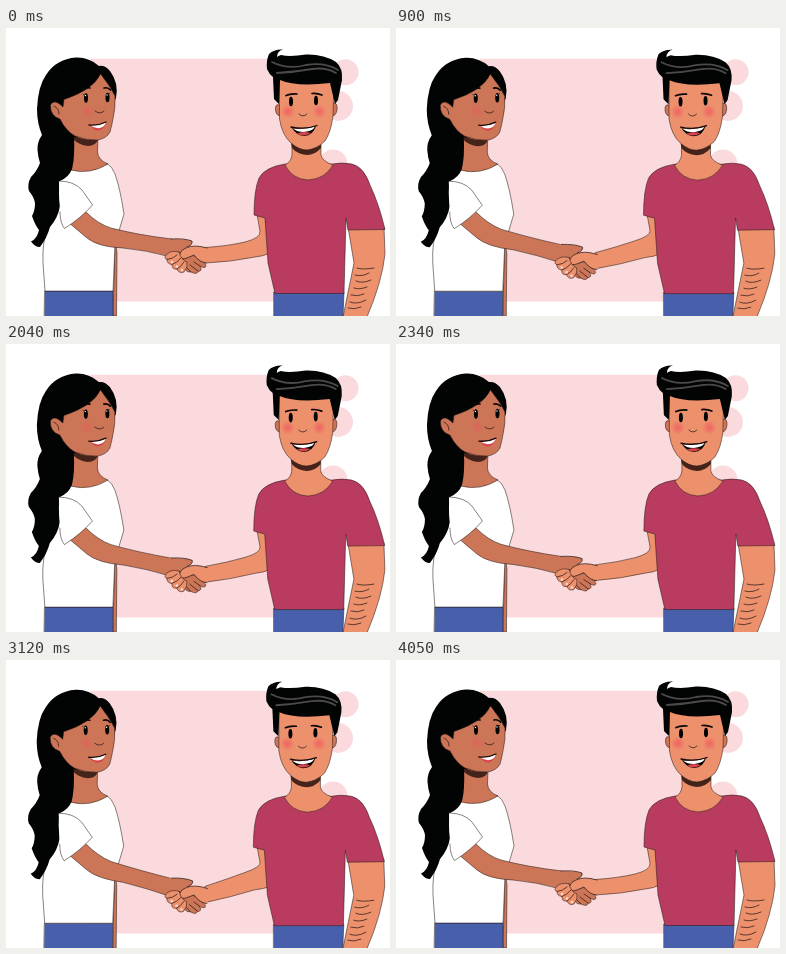
An HTML page for the animation above (5.34 s loop, 384x288 px).

```html
<!DOCTYPE html>
<html lang="en">
<head>
<meta charset="utf-8">
<title>Handshake</title>
<style>
html, body { margin: 0; width: 100%; height: 100%; overflow: hidden; background: #fff; }
svg { display: block; width: 100vw; height: 100vh; }
.line { stroke: #2a1c1a; stroke-width: .55; stroke-linejoin: round; stroke-linecap: round; }
.stroke { fill: none; stroke: #1d1413; stroke-width: .7; stroke-linecap: round; }
.brow { fill: none; stroke: #080606; stroke-width: 1.7; stroke-linecap: round; }
.lip { fill: none; stroke: #140607; stroke-width: 1.3; stroke-linecap: round; }
.pink { fill: #fadadc; }
.jeans { fill: #4860ab; }
.tan { fill: #cd7557; }
.peach { fill: #ed906c; }
.berry { fill: #b93b5f; }
.shade { fill: #43231a; }
.black { fill: #020303; }
.white { fill: #fff; }
.red { fill: #d8434a; }
.nail { fill: #fbd9cd; }
</style>
</head>
<body>
<svg viewBox="0 0 384 288">
  <defs>
    <radialGradient id="blush">
      <stop offset=".2" stop-color="#f0525c" stop-opacity=".6"/>
      <stop offset="1" stop-color="#f0525c" stop-opacity="0"/>
    </radialGradient>
  </defs>

  <g class="pink">
    <path d="M84 30.700H312V273.600H84Z"/>
    <circle cx="339.500" cy="44.300" r="13"/>
    <circle cx="332" cy="78" r="15"/>
    <circle cx="327" cy="136" r="14.500"/>
  </g>

  <g id="woman">
    <path class="tan line" d="M109 212L107 288H110.500L111 225Z"/>
    <path class="jeans line" d="M39 263H107V289H38.500Z"/>
    <path class="white line" d="M66 141Q57 145 52 154L42 198Q36 214 37 235L39 263H107L109 216L118 186Q114 160 109 146Q106 138 101 135.500Q84 141 66 141Z"/>
    <path class="tan line" d="M68 103L67 130Q67 137 65 142Q84 147 102 136Q92 132 91.500 124L92 109Z"/>
    <path class="shade" d="M67 107Q76 113 92 111.500Q90 118 82 118Q73 117 67 111Z"/>
    <path class="black" d="M70 29.500Q50 31 40 47Q32 58 31 81Q31 95 36 107Q31 114 31.500 122Q32 129 34 135Q31 143 25 149Q21 156 23 163Q28 169 29 175Q29 183 26 188Q29 197 33 202Q31 211 25 213.500Q29 219 34 219Q41 210 44 199Q52 190 54 178Q52 163 54 153Q63 149 66 141Q69 128 68 109Q88 111 97 100L110 70Q113 55 104 43Q99 37 93 38Q83 29 70 29.500Z"/>
    <path class="tan line" d="M94.500 46Q87 62 58 71.500L57 79Q48 70 44.500 77Q44 88 54 91Q60 103 69 108Q80 112.500 92 112Q101 110 104 104Q106 97 107.500 88Q109.500 80 109 68Q104 58 99 52Z"/>
    <path class="stroke" d="M48 78Q53 80 53 86M89 83Q94 87 98 83"/>
    <circle cx="81" cy="83" r="6.500" fill="url(#blush)" opacity=".65"/>
    <g class="black">
      <ellipse cx="80" cy="70" rx="2" ry="4.700"/>
      <ellipse cx="101.500" cy="69.500" rx="2" ry="4.700"/>
    </g>
    <path class="stroke" d="M77 66L79 68M104 65L102 67"/>
    <circle class="white" cx="79.500" cy="67.500" r=".7"/>
    <circle class="white" cx="101" cy="67" r=".7"/>
    <path class="brow" d="M76 62Q80 59 84 60M98 60Q102 59 104.500 62"/>
    <path class="red" d="M84 97Q92 98 100 94.500Q98 102 92 102.500Q87 102 84 97Z"/>
    <path class="white" d="M84 97Q92 98 100 94.500Q98 100 92 100.300Q87 100 84 97Z"/>
    <path class="lip" d="M83 97Q92 98 100 94"/>
  </g>

  <g id="man">
    <path class="peach line" d="M342 199L348 235L337 289H361Q376 254 379 226L378 199Z"/>
    <path class="stroke" d="M351 240Q357 242 368 240M349 247Q356 249 363 245M350 253Q356 256 365 252M348 260Q353 262 361 259M345 267Q352 269 358 266M344 274Q351 277 360 272M342 280Q348 282 355 279"/>
    <path class="jeans line" d="M268 264H338L337 289H268Z"/>
  </g>

  <path id="womanArm" class="tan line"/>
  <path id="manArm" class="peach line"/>

  <g id="manTop">
    <path class="berry line" d="M279 136Q259 139 253 150Q248 162 248 187L259 190L262 235L269 265.500H338L340 190L342 202L379 201.500Q373 176 364 157Q358 139 346 136Q336 134 326 136Z"/>
    <path class="peach line" d="M286 107V127Q285 134 279 137Q286 151 302 152Q319 151 327 137Q316 133 315 127V107Z"/>
    <path class="shade" d="M285 115Q300 126 315 116V120Q309 127 301 127Q291 126 286 120Z"/>
    <path class="tan line" d="M274 77Q269 75 269.500 82Q270 88 275 88M327 75Q332 74 331 82Q330 88 326 88"/>
    <path class="peach line" d="M273.500 50V91Q276 107 285 115Q293 122 301 122Q311 121 319 113Q325 104 327 88L328 50Z"/>
    <path class="black" d="M277 21.500Q268 21 263 26Q260 33 261 41Q263 46 267 49L268 71L273 76L274 52Q290 59 324 55L329 76L332 72L336 52Q337 40 330 34Q318 26 300 26.500Q284 29 275 27Q272 28 271 29Q271 23 277 21.500Z"/>
    <path fill="none" stroke="#4b494b" stroke-width="1.800" stroke-linecap="round" d="M266 34Q281 42 300 37Q319 34 332 42M271 45Q289 44 306 41Q320 39 330 45"/>
    <circle cx="282" cy="83.500" r="7" fill="url(#blush)"/>
    <circle cx="313.500" cy="83.500" r="7" fill="url(#blush)"/>
    <g class="black">
      <ellipse cx="285" cy="73.500" rx="2" ry="4.800"/>
      <ellipse cx="310" cy="72.500" rx="2" ry="4.800"/>
    </g>
    <path class="brow" d="M280 67.500Q284 65.500 291 66M306 65.500Q311 65 316 67"/>
    <path class="stroke" d="M293 86Q297 90 301 86"/>
    <path class="black" d="M286 100Q299 102 310 98Q307 107.500 298 108Q290 107 286 100Z"/>
    <path class="red" d="M291 105.500Q298 103 305 105Q298 109.500 291 105.500Z"/>
    <path class="white" d="M287 100.500Q299 102 309 98.500Q307 103 298 104Q291 104 287 100.500Z"/>
    <path class="lip" d="M285 99Q299 102 311 97.500"/>
  </g>

  <path id="sleeve" class="white line" d="M53 153Q68 153 76 162L86.500 177Q75 190 58.500 200.500Q54 195 54 184"/>

  <g id="hands">
    <path class="tan" d="M160 211.300Q178 210 186 213Q187 217 181 219Q174 224 178 230L166 236L160 228Z"/>
    <path class="stroke" d="M165 211Q178 210 186 213Q187 217 181 219"/>
    <path class="tan line" d="M176 231Q184 225 191 229Q199 234 200 238Q199 241 194 238Q197 243 192 243.500Q191 247 185 244Q180 245 176 237Z"/>
    <path class="stroke" d="M194 238L188 234M192 243L184 237M185 244L180 239"/>
    <path class="peach" d="M202 220Q188 216 180 220Q173 223 173.500 229Q176 232 181 230L188 227Q194 235 202 235Z"/>
    <path class="stroke" d="M201 220Q188 216 180 220Q173 223 173.500 229Q176 232 181 230L188 227Q194 235 201 235"/>
    <path class="peach line" d="M173 224Q166 222 161 226Q157 230 161 231.500Q161 236 166 236.500Q166 242 171 241Q173 246 178 244Q182 239 181 234Q175 232 173 224Z"/>
    <path class="stroke" d="M161 231.500Q167 231 171 227M166 236.500Q171 235 175 230M171 241Q175 239 178 234"/>
    <g class="nail">
      <circle cx="166" cy="234" r="1.300"/>
      <circle cx="171" cy="238.500" r="1.300"/>
      <circle cx="176" cy="242" r="1.300"/>
    </g>
  </g>
</svg>
<script>
const LOOP = 5340;
// [time in ms, how far the hands are lowered]
const POSES = [[0, 0], [1370, 8], [2400, 1.5], [3250, 8], [4050, 0], [LOOP, 0]];
const $ = id => document.getElementById(id);

function lowering(time) {
  const next = POSES.findIndex(([at]) => at > time);
  const [t0, y0] = POSES[next - 1];
  const [t1, y1] = POSES[next];
  return y0 + (y1 - y0) * (1 - Math.cos(Math.PI * (time - t0) / (t1 - t0))) / 2;
}

function draw(now) {
  const d = lowering(now % LOOP);
  const move = (id, x, y) => $(id).setAttribute('transform', `translate(${x} ${y})`);
  move('woman', -.04 * d, .03 * d);
  move('sleeve', -.04 * d, .03 * d);
  move('man', -.03 * d, .03 * d);
  move('manTop', -.08 * d, .03 * d);
  $('hands').setAttribute('transform', `translate(0 ${d}) rotate(${d * .3} 180 228)`);

  $('womanArm').setAttribute('d',
    `M72 174L80 184Q92 196 105 ${200 + d * .2}Q132 ${207 + d * .4} 166 ${211 + d}` +
    `L165 ${229 + d}Q140 ${222 + d * .8} 117 ${220 + d * .3}Q92 219 81 210L62 194Z`);
  $('manArm').setAttribute('d',
    `M250 181L254 ${203 - d * .1}Q255 ${210 - d * .4} 239 ${214 - d * .2}Q222 ${218 + d * .1} 199 ${219.500 + d * .9}` +
    `V${235 + d}Q225 ${234 + d * .4} 249 ${229 + d * .1}Q259 ${228 + d * .1} 263 ${225 + d * .2}L259 181Z`);
  requestAnimationFrame(draw);
}
draw(performance.now());
</script>
</body>
</html>
```
